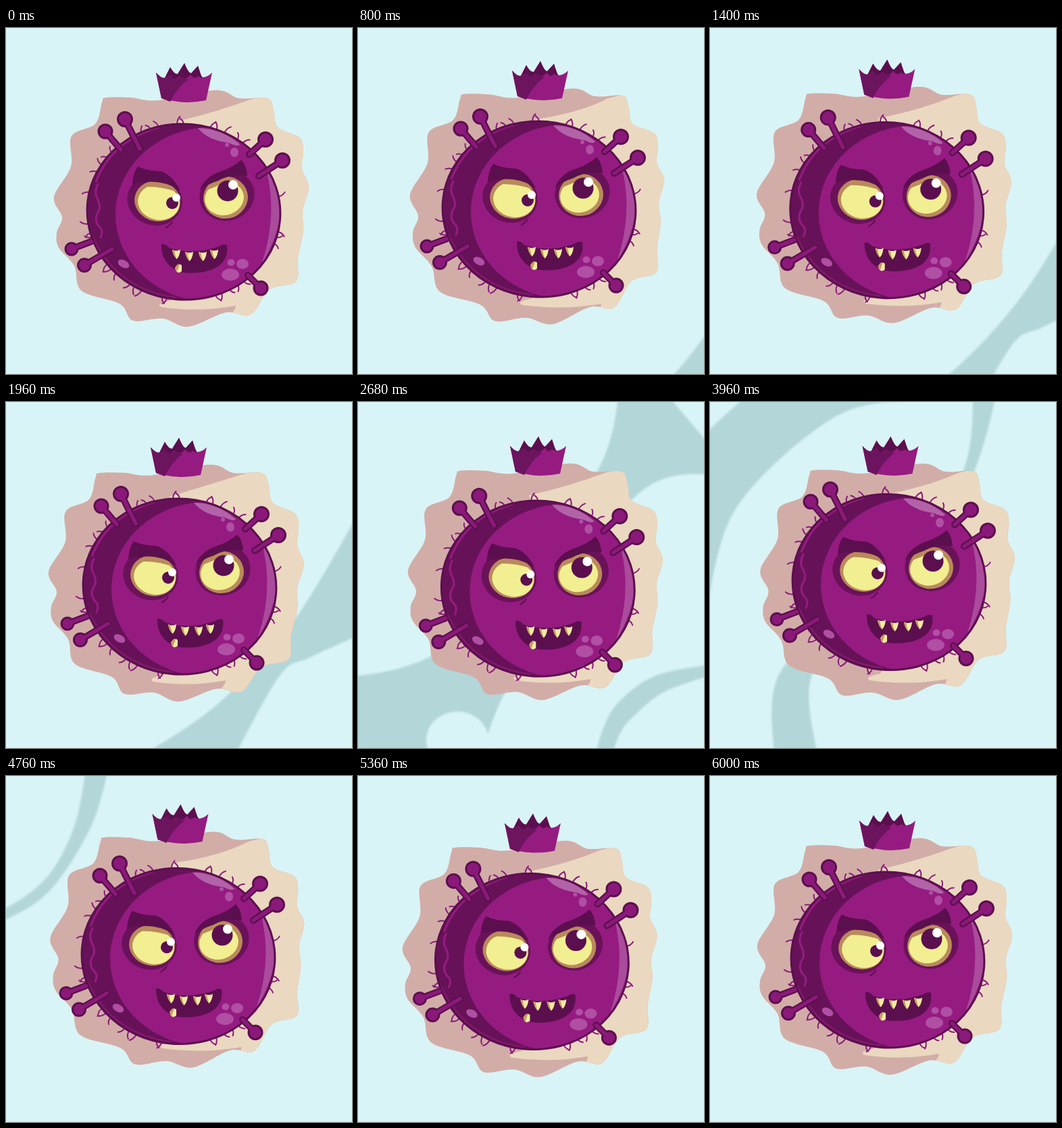
Animation, 512 px wide and 512 px high, one loop 6040 ms. Source, as an HTML page:

```html
<!DOCTYPE html>
<html lang="en">
<head>
<meta charset="utf-8">
<title>Crowned virus</title>
<style>
  html, body { margin: 0; width: 100%; height: 100%; overflow: hidden; background: #d9f4f6; }
  svg { display: block; width: 100vw; height: 100vh; }
  #smoke { filter: blur(1.6px); }
</style>
</head>
<body>
<svg viewBox="0 0 512 512">
  <defs>
    <clipPath id="auraClip"><path id="auraClipPath"/></clipPath>
    <clipPath id="bodyClip"><ellipse cx="263" cy="272" rx="143" ry="130" transform="rotate(5 263 272)"/></clipPath>
    <clipPath id="leftEyeClip"><path d="M185 222L206 235Q232 234 257 244L270 310H180Z"/></clipPath>
    <clipPath id="rightEyeClip"><path d="M285 246Q315 230 356 221L370 300H280Z"/></clipPath>
  </defs>
  <rect width="512" height="512" fill="#d9f4f6"/>
  <g id="smoke" fill="#b3d6d9">
    <path id="bandA"/>
    <ellipse id="pocket" rx="46" ry="42" fill="#d9f4f6"/>
    <path id="bandB"/>
  </g>

  <g id="aura">
    <path id="auraShape" fill="#d2ada8"/>
    <path id="auraLight" fill="#ebd8c0" clip-path="url(#auraClip)"/>
  </g>

  <g id="crown">
    <path d="M222 66Q231 76 235 74L243 58Q249 69 254 68L264 52Q270 67 274 67L284 56Q288 71 291 73Q298 73 305 66L296 107Q263 114 230 104Z" fill="#951b81"/>
    <path d="M235 74L243 58Q249 69 254 68L264 52Q270 67 274 67L284 56L290 74L284 71Q279 77 273 69Q266 79 257 71Q249 80 242 70Z" fill="#5c0f4e"/>
    <path d="M222 66Q231 76 236 73L243 69Q250 80 257 72L270 76Q253 88 243 109L230 104Z" fill="#6d145f"/>
  </g>

  <g id="virus">
    <g id="hairs" fill="none" stroke="#8b197a" stroke-width="2" stroke-linecap="round"/>
    <g clip-path="url(#bodyClip)">
      <rect x="100" y="130" width="330" height="290" fill="#671258"/>
      <ellipse cx="303" cy="276" rx="141" ry="129" fill="#951b81"/>
      <path d="M397 205Q424 275 378 350Q402 280 386 213Z" fill="#aa4b9c"/>
      <path d="M284 148Q318 148 346 172Q344 177 330 170Q298 166 284 148Z" fill="#b263a8"/>
      <path d="M133 228Q156 167 226 147" fill="none" stroke="#951b81" stroke-width="3"/>
      <path d="M136 231Q130 243 135 252T138 269Q129 282 137 293Q145 299 140 310" fill="none" stroke="#951b81" stroke-width="3" stroke-linecap="round"/>
      <path d="M129 310Q165 388 253 399" fill="none" stroke="#86196f" stroke-width="2"/>
    </g>
    <g fill="#b04fa3">
      <ellipse cx="338" cy="184" rx="6" ry="7"/><circle cx="327" cy="173" r="3"/>
      <ellipse cx="332" cy="365" rx="13" ry="9"/><ellipse cx="350" cy="349" rx="9" ry="7.5"/>
      <ellipse cx="333" cy="347" rx="5.5" ry="5"/>
      <ellipse cx="174" cy="349" rx="9" ry="5.5" transform="rotate(28 174 349)"/>
    </g>
    <ellipse cx="263" cy="272" rx="143" ry="130" transform="rotate(5 263 272)" fill="none" stroke="#5c0f4e" stroke-width="3"/>
    <g id="spikes" stroke-linecap="round"/>

    <g>
      <ellipse cx="220" cy="255" rx="41" ry="37" fill="#6a1259" transform="rotate(16 220 255)"/>
      <ellipse cx="327" cy="248" rx="41" ry="37" fill="#6a1259" transform="rotate(-18 327 248)"/>
      <path d="M236 296Q243 292 246 287" fill="none" stroke="#5c0f4e" stroke-width="2"/>
      <ellipse cx="224" cy="256" rx="34" ry="30" fill="#b98a5b" transform="rotate(12 224 256)"/>
      <g clip-path="url(#leftEyeClip)">
        <ellipse cx="226" cy="258" rx="31" ry="26" fill="#f1ef91" transform="rotate(10 226 258)"/>
        <circle cx="246" cy="259" r="9" fill="#5c0f4e"/>
      </g>
      <circle cx="252" cy="251" r="6" fill="#fff"/>
      <ellipse cx="325" cy="251" rx="33" ry="31" fill="#b98a5b" transform="rotate(-12 325 251)"/>
      <g clip-path="url(#rightEyeClip)">
        <ellipse cx="323" cy="252" rx="29" ry="25" fill="#f1ef91" transform="rotate(-12 323 252)"/>
      </g>
      <circle cx="328" cy="241" r="15.5" fill="#5c0f4e"/>
      <circle cx="336" cy="232" r="7" fill="#fff"/>
      <g fill="#5c0f4e">
        <path d="M187 232Q188 214 195 205Q210 212 229 212Q247 218 258 241Q235 225 205 228Q193 228 187 232Z"/>
        <path d="M287 240Q292 222 316 213Q338 205 348 195Q356 203 357 219Q333 215 314 226Q298 231 287 240Z"/>
      </g>
    </g>

    <g>
      <path d="M230 320Q236 319 241 325Q276 337 316 323Q320 319 327 321Q330 344 310 355Q288 366 257 361Q229 349 230 320Z" fill="#5c0f4e"/>
      <g id="teeth"/>
      <path d="M250 355Q255 347 260 351L260 360Q255 364 252 360Z" fill="#f4eca2"/>
      <path d="M250 355Q255 347 257 350L253 361Z" fill="#c79b62"/>
    </g>
  </g>
</svg>

<script>
const LOOP = 6040, STEP = 40;
const $ = id => document.getElementById(id);
const fix = n => n.toFixed(2);
const pairs = list => Array.from({ length: list.length / 2 }, (_, i) => list.slice(2 * i, 2 * i + 2));
const shift = (list, dx, dy) => list.map((v, i) => v + (i % 2 ? dy : dx));

// Catmull-Rom curve through points, as cubic segments.
function curve(pts, closed) {
  const n = pts.length;
  const at = i => closed ? pts[(i + n) % n] : pts[Math.max(0, Math.min(n - 1, i))];
  let d = pts[0].map(fix).join(' ');
  for (let i = 0; i < (closed ? n : n - 1); i++) {
    const [p, a, b, q] = [at(i - 1), at(i), at(i + 1), at(i + 2)];
    const c = a.map((v, k) => v + (b[k] - p[k]) / 6);
    const e = b.map((v, k) => v - (q[k] - a[k]) / 6);
    d += 'C' + [...c, ...e, ...b].map(fix).join(' ');
  }
  return d;
}

// Smooth looping track; each key is [time, ...values].
function sway(keys, t) {
  const n = keys.length;
  const at = i => {
    const wrap = Math.floor(i / n), k = keys[i - wrap * n];
    return [k[0] + wrap * LOOP, ...k.slice(1)];
  };
  let i = n - 1;
  while (keys[i][0] > t) i--;
  const [p, a, b, q] = [at(i - 1), at(i), at(i + 1), at(i + 2)];
  const span = b[0] - a[0], u = (t - a[0]) / span;
  return a.slice(1).map((v, j) => {
    const k = j + 1;
    const m0 = (b[k] - p[k]) / (b[0] - p[0]) * span;
    const m1 = (q[k] - a[k]) / (q[0] - a[0]) * span;
    return v * (2*u**3 - 3*u*u + 1) + m0 * (u**3 - 2*u*u + u) + b[k] * (3*u*u - 2*u**3) + m1 * (u**3 - u*u);
  });
}

// Straight track; each key is [time, values], null when out of range.
function glide(keys, t) {
  const i = keys.findIndex((k, j) => j < keys.length - 1 && t >= k[0] && t < keys[j + 1][0]);
  if (i < 0) return null;
  const [a, b] = [keys[i], keys[i + 1]], u = (t - a[0]) / (b[0] - a[0]);
  return a[1].map((v, j) => v + (b[1][j] - v) * u);
}

// time, x, y, ripple amount
const auraKeys = [
  [0, 0, 0, 0], [800, 6, -3, 1], [1280, 0, -6, .5], [1960, -8, 1, -.5], [2680, 3, -1, .1],
  [3960, 3.5, -1, .5], [4760, -5.5, -10, 1], [5440, -5, 5, .3], [5760, -6, 3, 0], [6000, -1, 0, 0]
];
const bodyKeys = [
  [0, 0, 0], [800, 5, -4], [1280, 0, -3], [1960, -6, 1], [2680, 3.3, 4],
  [3960, 2, -5.5], [4760, -8, -5.5], [5440, -5, 3], [6000, 0, 0]
];

const auraPoints = pairs([
  148,103, 185,103, 225,107, 310,92, 345,104, 387,104, 396,122, 402,147, 434,162, 440,182, 438,208,
  448,235, 439,270, 440,300, 432,340, 429,375, 390,387, 362,424, 325,421, 270,442, 232,430, 188,433,
  168,408, 112,389, 101,352, 78,325, 75,303, 83,280, 71,250, 96,205, 97,160, 132,142, 142,110
]);

// The rim slides along itself, most at the lower right.
function ripple([x, y], w) {
  const a = Math.atan2(y - 267, x - 260);
  const m = w * (4.5 + 8.5 * Math.cos(a - Math.PI / 3));
  return [x + m * Math.sin(a), y - m * Math.cos(a)];
}

// Each band: leading edge, then trailing edge back again.
const sweepIn = [190,530, 312,448, 425,325, 530,150, 530,342, 450,378, 405,405, 335,530];
const sweepMid = [-150,410, 115,372, 350,110, 390,-90, 560,110, 410,140, 215,435, 160,640];
const sweepOut = [-60,110, -20,60, 46,-2, 90,-40, 310,-4, 185,22, 40,155, -6,310];
const bandAKeys = [
  [580, shift(sweepIn, 130, 195)], [800, shift(sweepIn, 85, 135)], [1960, sweepIn],
  [2680, sweepMid], [3960, sweepOut], [4700, shift(sweepOut, -200, -190)]
];
const tailIn = [350,530, 362,485, 385,445, 440,405, 530,387, 530,402, 455,428, 410,463, 388,490, 373,530];
const tailMid = [95,530, 107,395, 262,290, 372,110, 390,-20, 426,-20, 388,110, 290,305, 155,395, 160,530];
const tailOut = [-20,207, 38,171, 75,130, 104,65, 120,-20, 154,-20, 130,65, 88,140, 45,187, -20,222];
const bandBKeys = [
  [1880, shift(tailIn, 130, 130)], [1960, shift(tailIn, 115, 107)], [2680, tailIn],
  [3960, tailMid], [4760, tailOut], [5500, shift(tailOut, -160, -140)]
];
const pocketKeys = [[1960, [335, 558]], [2680, [147, 500]], [3960, [-160, 300]]];

function drawBand(id, keys, t) {
  const p = pairs(glide(keys, t) || []), half = p.length / 2;
  $(id).setAttribute('d', half ? `M${curve(p.slice(0, half))}L${curve(p.slice(half))}Z` : '');
}

function lightPath(w) {
  const end = 340 + 14 * w, tip = 225 + 7 * w;
  return `M250 139Q${310 + 10 * w} ${125 + 5 * w} 364 ${105 + 2 * w}L470 80L480 450L${end - 15} 432` +
    `Q${end} 418 ${end} 411Q${end - 55} 421 ${tip + 5} 413Q${tip - 6} 408 ${tip + 20} 403L300 300Z`;
}

function buildVirus() {
  const hairAngles = [250, 244, 255, 266, 270, 286, 290, 295, 304, 308, 207, 212, 218, 222, 193, 172, 166, 163,
    143, 139, 135, 124, 121, 116, 103, 100, 71, 67, 62, 56, 52, 13, 17, 21, 350];
  $('hairs').innerHTML = hairAngles.map((deg, i) => {
    const a = deg * Math.PI / 180, bend = i % 2 ? .035 : -.035, long = 8 + i * 5 % 4;
    const at = (r, turn) => fix(263 + (143 + r) * Math.cos(a + turn)) + ' ' + fix(272 + (130 + r) * Math.sin(a + turn));
    return `<path d="M${at(-2, 0)}Q${at(long * .6, 0)} ${at(long, bend)}"/>`;
  }).join('');

  // knob x, y, radius, then stalk foot
  const spikes = [
    [147, 153, 10, 170, 180], [176, 135, 10.5, 198, 179], [384, 165, 10.5, 360, 187], [409, 196, 10.5, 374, 219],
    [97, 327, 9, 126, 316], [116, 351, 9.5, 157, 327], [377, 385, 10, 358, 366]
  ];
  $('spikes').innerHTML = spikes.map(([x, y, r, fx, fy]) => {
    const line = (color, width) => `<path d="M${x} ${y}L${fx} ${fy}" stroke="${color}" stroke-width="${width}"/>`;
    return line('#5c0f4e', 10) + `<circle cx="${x}" cy="${y}" r="${r}" fill="#8b197a" stroke="#5c0f4e" stroke-width="3"/>` +
      line('#8b197a', 5.5);
  }).join('');

  $('teeth').innerHTML = [[246, 328], [265, 331], [285, 331], [302, 328]].map(([x, y]) =>
    `<g transform="translate(${x} ${y})"><path d="M0 0Q6 3 12 0Q11 10 6.5 14Q1 8 0 0Z" fill="#f4eca2"/>` +
    '<path d="M0 0Q1 8 6.5 14Q4 7 3 1Z" fill="#c79b62"/></g>').join('');
}

function draw(t) {
  drawBand('bandA', bandAKeys, t);
  drawBand('bandB', bandBKeys, t);
  const [px, py] = glide(pocketKeys, t) || [-200, -200];
  $('pocket').setAttribute('cx', px);
  $('pocket').setAttribute('cy', py);

  const [x, y, w] = sway(auraKeys, t);
  const shape = `M${curve(auraPoints.map(p => ripple(p, w)), true)}Z`;
  $('auraShape').setAttribute('d', shape);
  $('auraClipPath').setAttribute('d', shape);
  $('auraLight').setAttribute('d', lightPath(w));
  for (const id of ['aura', 'crown']) $(id).setAttribute('transform', `translate(${fix(x)} ${fix(y)})`);

  const [bx, by] = sway(bodyKeys, t);
  $('virus').setAttribute('transform', `translate(${fix(bx)} ${fix(by)})`);
}

buildVirus();
const start = performance.now();
function tick() {
  const t = (performance.now() - start) % LOOP;
  draw(Math.floor(t / STEP) * STEP);
  requestAnimationFrame(tick);
}
tick();
</script>
</body>
</html>
```
